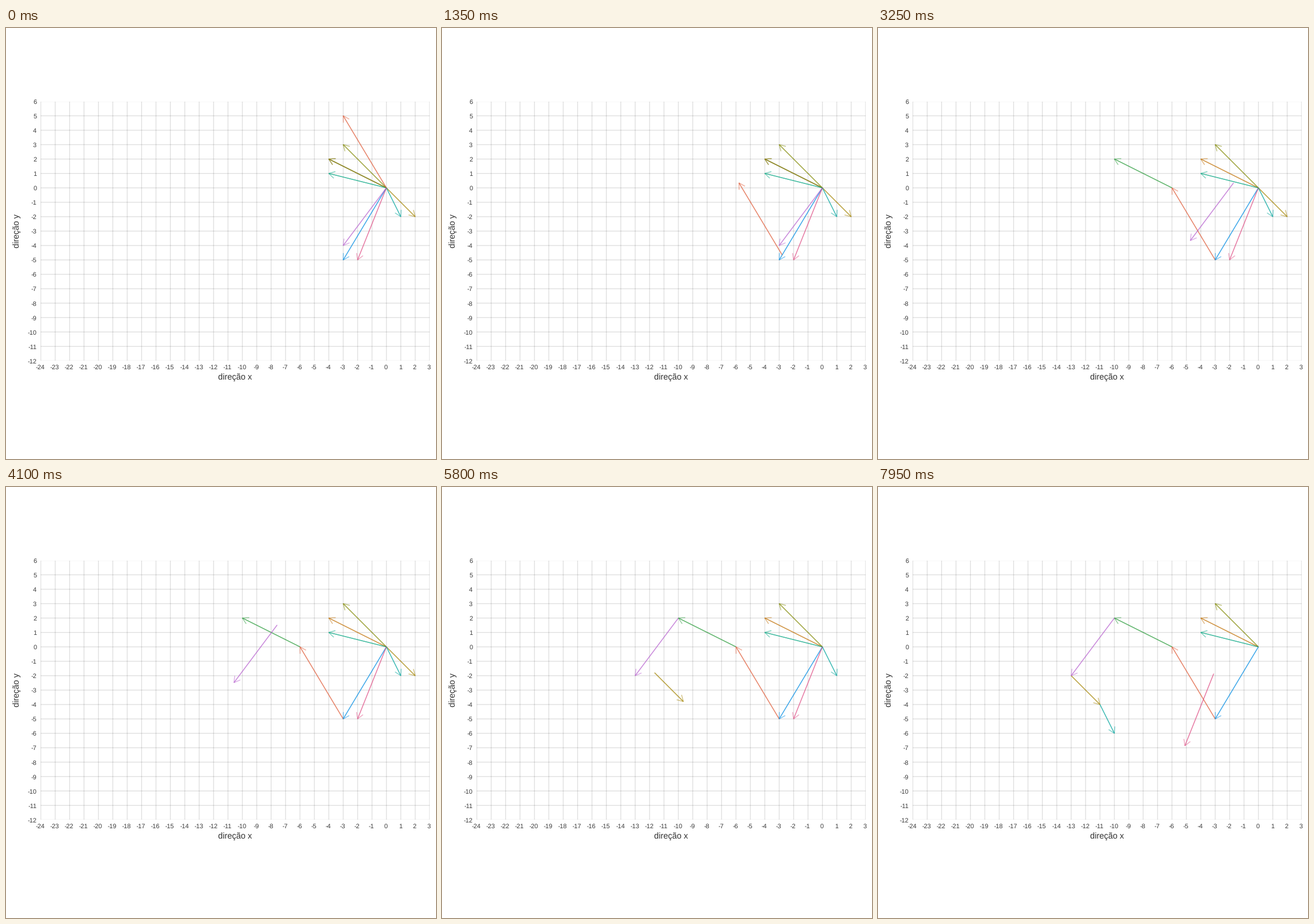
These frames come from a looping animation (748 px wide and 749 px high, 8000 ms). A matplotlib script:

```python
import math

import matplotlib.pyplot as plt
from matplotlib.animation import FuncAnimation
from matplotlib.patches import Rectangle

W, H, DPI = 748, 749, 64
PT = 72 / DPI            # points per pixel
UNIT = 25.05             # pixels per grid unit
OX, OY = 661.7, 277.8    # grid origin in pixels
X_MIN, X_MAX, Y_MIN, Y_MAX = -24, 3, -12, 6
STROKE = 1.42
HEAD = 12
STEP = 30                # frames per move

plt.rcParams["font.family"] = "Liberation Sans"
plt.rcParams["text.hinting"] = "none"

# (dx, dy, colour), back to front
ARROWS = [
    (-4, 2, "#279a38"),
    (-4, 2, "#c06e00"),
    (-3, 3, "#808800"),
    (-4, 1, "#00a580"),
    (2, -2, "#a38300"),
    (1, -2, "#00a59d"),
    (-3, 5, "#e05c39"),
    (-3, -5, "#008de4"),
    (-3, -4, "#b862d0"),
    (-2, -5, "#e05187"),
]
FIRST = 7                      # arrow the chain starts from
MOVERS = [6, 0, 8, 4, 5, 9]    # arrows in the order they join it


def px(x, y):
    return OX + x * UNIT, OY - y * UNIT


def chain_targets():
    x, y, _ = ARROWS[FIRST]
    targets = []
    for i in MOVERS:
        targets.append((x, y))
        x += ARROWS[i][0]
        y += ARROWS[i][1]
    return targets


TARGETS = chain_targets()

fig = plt.figure(figsize=(W / DPI, H / DPI), dpi=DPI, facecolor="white")
ax = fig.add_axes([0, 0, 1, 1])
ax.set_xlim(0, W)
ax.set_ylim(H, 0)
ax.axis("off")


def stroke(xs, ys, color, alpha):
    line, = ax.plot(xs, ys, color=color, alpha=alpha, lw=STROKE * PT,
                    solid_capstyle="butt", solid_joinstyle="miter")
    line.set_snap(False)
    return line


def label(x, y, text, size, color, **kw):
    ax.text(x, y, text, fontsize=size * PT, color=color, **kw)


def draw_grid():
    left, top = px(X_MIN, Y_MAX)
    right, bottom = px(X_MAX, Y_MIN)
    panel = Rectangle((left, top), right - left, bottom - top,
                      transform=ax.transData)
    lines = []
    for v in range(Y_MIN, Y_MAX + 1):
        y = px(0, v)[1]
        lines.append(stroke([left, right], [y, y], "black", 0.12))
        label(53.2, y + 4.2, str(v), 11, "#3a3a3a", ha="right", va="baseline")
    for v in range(X_MIN, X_MAX + 1):
        x = px(v, 0)[0]
        lines.append(stroke([x, x], [top, bottom], "black", 0.12))
        label(x - 1, 593, str(v), 11, "#3a3a3a", ha="center", va="baseline")
    for line in lines:
        line.set_clip_path(panel)
    label((left + right) / 2 - 0.7, 611.5, "direção x", 14.5, "#333333",
          ha="center", va="baseline")
    label(24, (top + bottom) / 2, "direção y", 14.5, "#333333",
          rotation=90, rotation_mode="anchor", ha="center", va="baseline")


draw_grid()

# Half-transparent shafts are laid down twice, heads once.
under = []
for *_, c in ARROWS:
    under.append((stroke([], [], c, 0.5), stroke([], [], c, 0.5)))
over = [stroke([], [], c, 0.5) for *_, c in ARROWS]


def place(i, x, y):
    dx, dy, _ = ARROWS[i]
    x0, y0 = px(x, y)
    x1, y1 = px(x + dx, y + dy)
    back = math.atan2(y0 - y1, x0 - x1)
    a, b = back - math.pi / 6, back + math.pi / 6
    shaft, head = under[i]
    shaft.set_data([x0, x1], [y0, y1])
    over[i].set_data([x0, x1], [y0, y1])
    head.set_data([x1 + HEAD * math.cos(a), x1, x1 + HEAD * math.cos(b)],
                  [y1 + HEAD * math.sin(a), y1, y1 + HEAD * math.sin(b)])


def update(n):
    for i in range(len(ARROWS)):
        place(i, 0, 0)
    for k, (i, (tx, ty)) in enumerate(zip(MOVERS, TARGETS)):
        p = min(max((n - k * STEP) / (STEP - 1), 0), 1)
        place(i, tx * p, ty * p)
    return over


anim = FuncAnimation(fig, update, frames=160, interval=50, repeat=True,
                     repeat_delay=0, init_func=lambda: update(0), blit=False)
plt.show()
```
